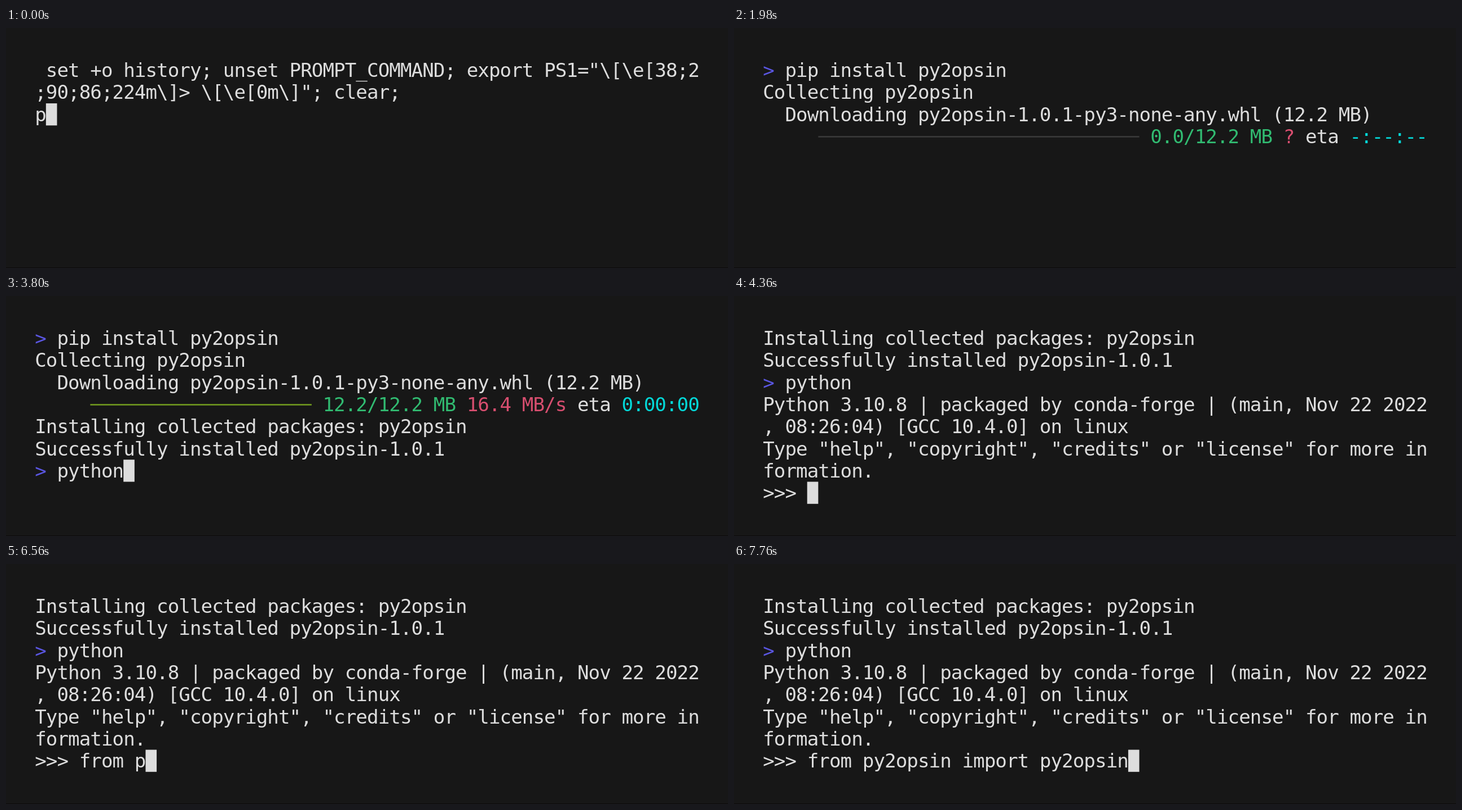
Write an HTML page with a canvas that moves like this. It is 1280x427 px and loops after 8 s.

```html
<!DOCTYPE html>
<html lang="en">
<head>
<meta charset="utf-8">
<title>Terminal session</title>
<style>
  html, body { margin: 0; width: 100%; height: 100%; overflow: hidden; background: #171717; }
  canvas { display: block; width: 100%; height: 100%; }
</style>
</head>
<body>
<canvas id="screen" width="1280" height="427"></canvas>
<script>
const LOOP = 8000, TICK = 20;
const CELL_W = 23, CELL_H = 46, BASELINE = 37, COLS = 60;
const C = {
  bg: '#171717', fg: '#dddddd', prompt: '#5a56e0', green: '#31bb71', red: '#d74e6f',
  cyan: '#04d7d7', bar: '#f92672', barDone: '#729c1f', barRest: '#3a3a3a', edge: '#0c0a0b'
};
const ctx = document.getElementById('screen').getContext('2d');

const SETUP = [
  String.raw` set +o history; unset PROMPT_COMMAND; export PS1="\[\e[38;2`,
  String.raw`;90;86;224m\]> \[\e[0m\]"; clear;`,
  'p'
];
const BANNER = [
  'Python 3.10.8 | packaged by conda-forge | (main, Nov 22 2022',
  ', 08:26:04) [GCC 10.4.0] on linux',
  'Type "help", "copyright", "credits" or "license" for more in',
  'formation.'
];
const INSTALL = 'pip install py2opsin';
const IMPORT = 'from py2opsin import py2opsin';

// Typing runs: [start, interval, characters already there, characters at the end]
const INSTALL_RUNS = [[60, 48.75, 0, 17], [900, 60, 17, 20]];
const PYTHON_RUNS = [[3540, 52, 0, 6]];
const IMPORT_RUNS = [[6280, 53.33, 0, 16], [7160, 50, 16, 29]];

function typed(text, runs, t) {
  let count = 0;
  for (const [start, interval, from, to] of runs) {
    if (t >= start) count = Math.min(to, from + 1 + Math.floor((t - start) / interval));
  }
  return text.slice(0, count);
}

const DOWNLOAD = { start: 1980, interval: 36, last: 20, total: 12.2 };

function download(t) {
  const { start, interval, last, total } = DOWNLOAD;
  const step = Math.min(last, Math.floor((t - start) / interval));
  const done = step === last;
  const elapsed = (11 + step * interval) / 1000;
  const mb = step ? Math.min(total, 11.56 * (elapsed / 0.587) ** 1.4) : 0;
  const rate = done ? 16.4 : mb / elapsed;
  const seconds = done ? 0 : Math.max(1, Math.ceil((total - mb) / rate));
  const size = ` ${mb.toFixed(1)}/${total} MB `;
  const speed = step ? `${rate.toFixed(1)} MB/s` : '?';
  const eta = step ? `0:00:0${seconds}` : '-:--:--';
  const width = COLS - 5 - (size + speed + ' eta ' + eta).length;
  return [
    ['     '], { width, halves: Math.floor(width * 2 * mb / total), done },
    [size, C.green], [speed, C.red], [' eta '], [eta, C.cyan]
  ];
}

const plain = text => [[text]];
const prompt = text => [['> ', C.prompt], [text]];

// Rows of the terminal and the cursor as [column, row]
function sessionAt(t) {
  if (t < 60) return { rows: SETUP.map(plain), cursor: [1, 2] };

  const command = typed(INSTALL, INSTALL_RUNS, t);
  const rows = [prompt(command)];
  let cursor = [2 + command.length, 0];
  if (t >= 1540) cursor = [0, 1];
  if (t >= 1920) {
    rows.push(plain('Collecting py2opsin'));
    cursor = [0, 2];
  }
  if (t >= 1960) {
    rows.push(plain('  Downloading py2opsin-1.0.1-py3-none-any.whl (12.2 MB)'));
    cursor = [0, 3];
  }
  if (t >= 1980) {
    rows.push(download(t));
    cursor = t >= 2700 ? [0, 4] : null;
  }
  if (t >= 2780) {
    rows.push(plain('Installing collected packages: py2opsin'));
    cursor = [0, 5];
  }
  if (t >= 2900) {
    rows.push(plain('Successfully installed py2opsin-1.0.1'));
    cursor = [0, 6];
  }
  if (t >= 2960) {
    const python = typed('python', PYTHON_RUNS, t);
    rows.push(prompt(python));
    cursor = [2 + python.length, 6];
  }
  if (t >= 4320) cursor = [0, 7];
  if (t >= 4340) {
    rows.splice(0, 4);
    rows.push(...BANNER.map(plain));
  }
  if (t >= 4360) {
    const code = typed(IMPORT, IMPORT_RUNS, t);
    rows.push(plain('>>> ' + code));
    const blinkedOff = (t >= 4940 && t < 5520) || (t >= 6100 && t < 6280);
    cursor = blinkedOff ? null : [4 + code.length, 7];
  }
  return { rows, cursor };
}

function drawText(text, col, row, color) {
  ctx.fillStyle = color;
  [...text].forEach((char, i) => {
    if (char !== ' ') ctx.fillText(char, (col + i) * CELL_W, row * CELL_H + BASELINE);
  });
}

function drawBar({ width, halves, done }, col, row) {
  const line = (from, to, color) => {
    ctx.fillStyle = color;
    ctx.fillRect((col + from) * CELL_W, row * CELL_H + 22, (to - from) * CELL_W, 3);
  };
  const end = halves / 2;
  if (end < width) line(halves ? end + 0.5 : 0, width, C.barRest);
  line(0, end, done ? C.barDone : C.bar);
}

function draw(t) {
  const { rows, cursor } = sessionAt(t);
  ctx.setTransform(1, 0, 0, 1, 0, 0);
  ctx.fillStyle = C.bg;
  ctx.fillRect(0, 0, 1280, 427);
  ctx.fillStyle = C.edge;
  ctx.fillRect(0, 426, 1280, 1);

  ctx.scale(1280 / 1500, 427 / 500);
  ctx.translate(60, 65);
  ctx.font = '40px "DejaVu Sans Mono", monospace';
  rows.forEach((parts, row) => {
    let col = 0;
    for (const part of parts) {
      if (part.width) {
        drawBar(part, col, row);
        col += part.width;
      } else {
        const [text, color = C.fg] = part;
        drawText(text, col, row, color);
        col += text.length;
      }
    }
  });
  if (cursor) {
    ctx.fillStyle = C.fg;
    ctx.fillRect(cursor[0] * CELL_W, cursor[1] * CELL_H, CELL_W, CELL_H);
  }
}

const origin = performance.now();
let shown = -1;
function frame() {
  const time = (performance.now() - origin) % LOOP;
  const t = Math.floor(time / TICK) * TICK;
  if (t !== shown) draw(shown = t);
  requestAnimationFrame(frame);
}
frame();
</script>
</body>
</html>
```
